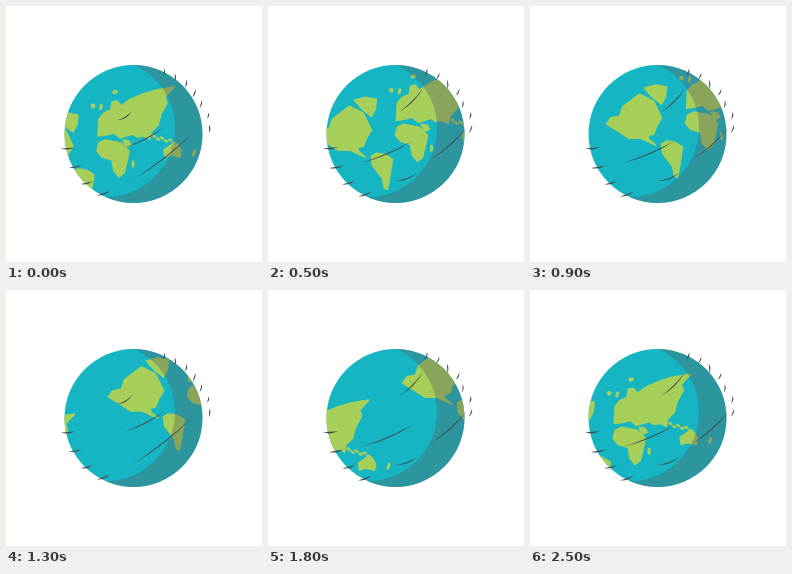
These frames come from a looping animation (256 by 256 pixels, 2.6 s). An HTML page:

```html
<!DOCTYPE html>
<html lang="en">
<head>
<meta charset="utf-8">
<title>Spinning globe</title>
<style>
  html, body { margin: 0; width: 100%; height: 100%; overflow: hidden; background: #fff; }
  svg { display: block; width: 100vw; height: 100vh; }
  .land { fill: #a6cf59; stroke: #a6cf59; stroke-width: 1.6; stroke-linejoin: round; }
  .wind { fill: #454b4c; }
</style>
</head>
<body>
<svg viewBox="0 0 256 256">
  <defs>
    <clipPath id="disk"><circle cx="127.5" cy="128" r="69"/></clipPath>
    <g id="world" class="land"></g>
  </defs>
  <g clip-path="url(#disk)">
    <rect width="256" height="256" fill="#15b5c3"/>
    <g id="map">
      <use href="#world" x="-190" y="82"/>
      <use href="#world"/>
    </g>
    <!-- everything outside the lit circle -->
    <path d="M0 0H256V256H0ZM31 122a69 69 0 0 1 138 0a69 69 0 0 1 -138 0Z"
          fill="rgb(88,94,95)" fill-opacity=".37" fill-rule="evenodd"/>
  </g>
  <g id="windA" class="wind"></g>
  <g id="windB" class="wind"></g>
</svg>
<script>
const $ = id => document.getElementById(id);
const STEP = 100, COUNT = 26, HOLD = 5;
const WIDTH = 190, SLOPE = 82 / 190;

const coasts = {
  eurasia: '92,130 93,113 98,107 105,104 106,96 111,95 115,100 125,93 137,88 150,84 168,81 159,91 161,97 155,108 152,119 145,126 144,133 138,130 131,131 127,128 114,132 108,127 100,129',
  africa: '93,137 99,134 115,137 123,145 121,155 118,167 113,171 108,165 106,154 96,151 91,145',
  arabia: '117,134 123,135 125,139 120,141',
  australia: '158,144 165,139 171,138 175,145 174,151 165,149 159,151',
  northAmerica: '12,146 16,140 25,138 28,129 37,122 45,116 59,123 67,140 62,148 59,156 54,157 54,161 61,167 46,160 34,160 25,154',
  greenland: '50,110 61,107 72,109 71,118 67,126 58,119',
  southAmerica: '67,166 72,163 80,164 88,169 85,188 83,199 80,198 78,188 68,175'
};

const isle = (x, y, rx, ry, turn = 0) =>
  `<ellipse rx="${rx}" ry="${ry}" transform="translate(${x} ${y}) rotate(${turn})"/>`;

// Britain, Iceland, Svalbard, Madagascar, Japan, New Zealand
const isles = [
  isle(95, 101, .8, 2.5, 15), isle(87, 100, 1.6, 1.6), isle(109, 86, 2, 1.2, -20),
  isle(127, 158, .8, 3), isle(159, 99, .6, 3, 20), isle(188, 147, .8, 3, 15)
];
// Indonesia
for (let i = 0; i < 6; i++) isles.push(isle(148 + i * 4, 130 + i + 2 * (i % 2), 1.6, .6, 40 - i * 6));

$('world').innerHTML =
  Object.values(coasts).map(p => `<polygon points="${p}"/>`).join('') + isles.join('');

function seeded(s) {
  return () => (s = s * 16807 % 2147483647) / 2147483647;
}

// Tapered stroke between two points, bowed by bend
function brush(x1, y1, x2, y2, w, bend) {
  const len = Math.hypot(x2 - x1, y2 - y1);
  const nx = (y1 - y2) / len, ny = (x2 - x1) / len;
  const mid = k => `${(x1 + x2) / 2 + nx * k} ${(y1 + y2) / 2 + ny * k}`;
  return `<path d="M${x1} ${y1}Q${mid(2 * bend + w)} ${x2} ${y2}Q${mid(2 * bend - w)} ${x1} ${y1}Z"/>`;
}

// Short stroke near the rim of the globe
function rim(angle, radius, lean, len, w) {
  const a = angle * Math.PI / 180, l = lean * Math.PI / 180;
  const x = 127.5 + radius * Math.cos(a), y = 128 + radius * Math.sin(a);
  const dx = Math.cos(l) * len / 2, dy = Math.sin(l) * len / 2;
  return brush(x - dx, y - dy, x + dx, y + dy, w, .8);
}

function wind(seed, long) {
  const rand = seeded(seed);
  const marks = long.map(([x1, y1, x2, y2]) => brush(x1, y1, x2, y2, 1.1, 2));
  for (let i = 0; i < 7; i++)
    marks.push(rim(-64 + i * 10, 69 + i + 3 * rand(), -62 - 35 * rand(), 6 + 4 * rand(), 1.2));
  for (let i = 0; i < 4; i++)
    marks.push(rim(168 - i * 17, 66 + 2 * rand(), -4 - i * 5, 12 + 4 * rand(), 1.4));
  return marks.join('');
}

$('windA').innerHTML = wind(11, [[117, 142, 159, 121], [127, 174, 187, 127], [111, 114, 126, 105]]);
$('windB').innerHTML = wind(47, [[93, 157, 146, 134], [162, 154, 199, 121], [131, 106, 155, 82], [127, 175, 149, 167]]);

// Nearly even turn that lags a little late in the loop
function turn(p) {
  return WIDTH * p - 4.5 * (1 - Math.cos(2 * Math.PI * p * p));
}

function draw(t) {
  const n = Math.floor(t / STEP) % COUNT;
  const x = turn(n / COUNT);
  const first = Math.floor(n / HOLD) % 2 === 0;
  $('map').setAttribute('transform', `translate(${x} ${-SLOPE * x})`);
  $('windA').style.display = first ? '' : 'none';
  $('windB').style.display = first ? 'none' : '';
}

const start = performance.now();
function tick() {
  draw(performance.now() - start);
  requestAnimationFrame(tick);
}
tick();
</script>
</body>
</html>
```
